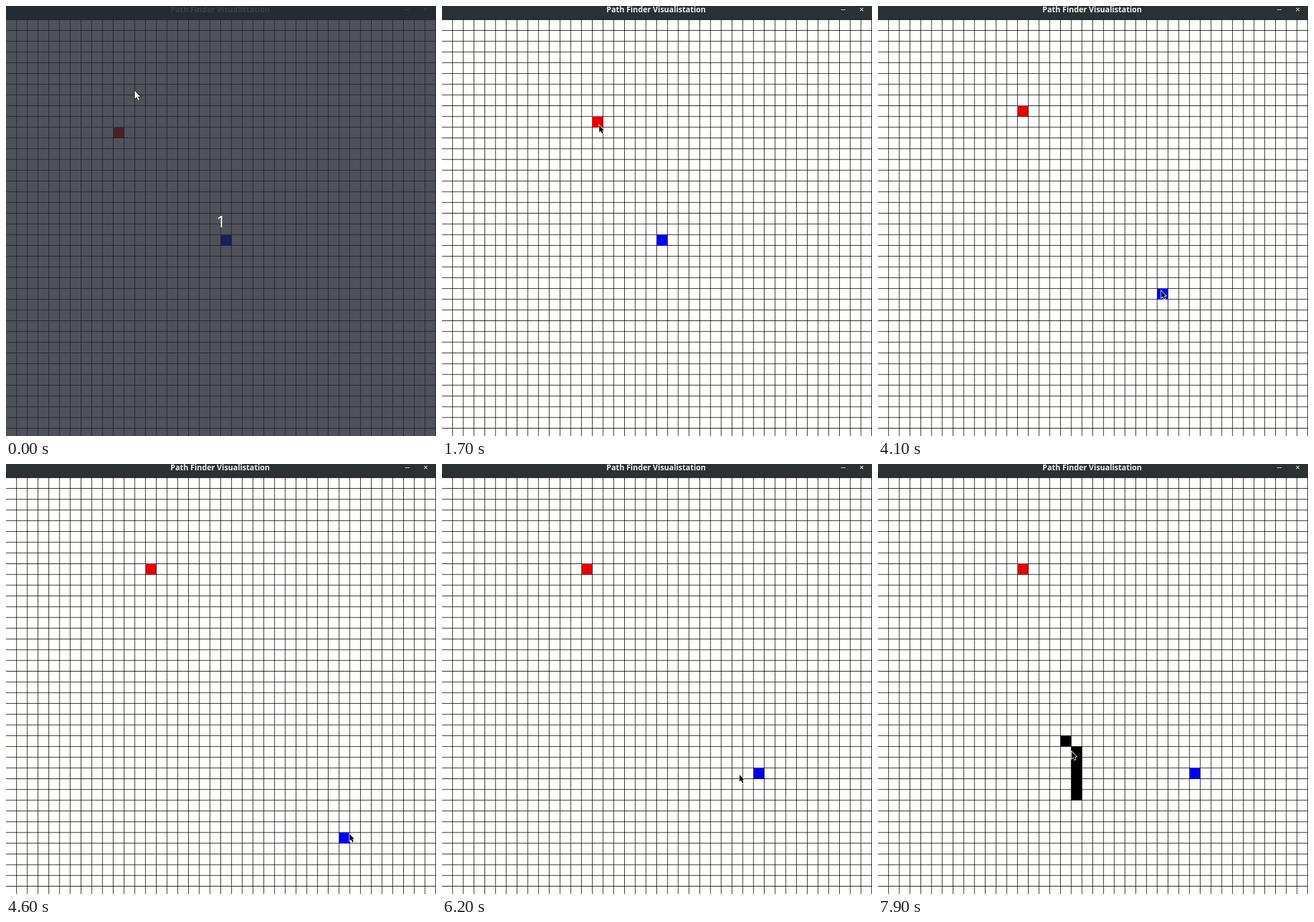
An HTML page with a canvas for the animation above (8 s loop, 748 px wide and 748 px high).

```html
<!DOCTYPE html>
<html lang="en">
<head>
<meta charset="utf-8">
<title>Path Finder</title>
<style>
  html, body { margin: 0; height: 100%; overflow: hidden; }
  canvas { display: block; }
</style>
</head>
<body>
<canvas id="stage" width="748" height="748"></canvas>
<script>
const SIZE = 748, SCENE = 800, SCALE = SIZE / SCENE;
const LOOP = 8000, STEP = 100;
const CELL = 20, LEFT = 19, TOP = 45, TITLE = 25;

const ctx = document.getElementById('stage').getContext('2d');

// The board is drawn with crisp pixels here, then scaled softly onto the stage
const board = document.createElement('canvas');
board.width = board.height = SCENE;
const pen = board.getContext('2d');

// Pointer strokes in stage pixels: [start ms, end ms, x, y]; it rests in between
const home = [225, 149];
const strokes = [
  [300, 600, 205, 233], [700, 900, 193, 225],
  [1400, 1700, 273, 207], [1700, 1900, 286, 196], [1900, 2300, 247, 178],
  [2600, 2800, 352, 386], [2900, 3400, 384, 398],
  [3700, 4100, 492, 495], [4100, 4600, 597, 643], [4600, 4900, 583, 663],
  [4900, 5400, 537, 553], [5400, 5700, 552, 539],
  [6100, 6200, 517, 540], [6200, 6600, 352, 577], [6700, 7000, 344, 577],
  [7600, 8000, 334, 474]
];

const clamp = (v, lo, hi) => Math.min(hi, Math.max(lo, v));

function pointerAt(t) {
  let [x, y] = home;
  for (const [start, end, toX, toY] of strokes) {
    const k = clamp((t - start) / (end - start), 0, 1);
    x += (toX - x) * k;
    y += (toY - y) * k;
  }
  return [x, y];
}

function rect(c, color, x, y, w, h) {
  c.fillStyle = color;
  c.fillRect(x, y, w, h);
}

function fillCellUnderPointer(color, t) {
  const [x, y] = pointerAt(t);
  const snap = (v, origin) => origin + CELL * Math.floor((v / SCALE - origin) / CELL);
  rect(pen, color, snap(x, LEFT), snap(y, TOP), CELL, CELL);
}

function drawBoard(t) {
  rect(pen, '#fffffd', 0, 0, SCENE, SCENE);
  for (let p = 0; p < SCENE; p += CELL) {
    rect(pen, '#000', LEFT + p, 0, 1, SCENE);
    rect(pen, '#000', 0, TITLE + p, SCENE, 1);
  }
  // Each end cell follows the pointer only while it is held
  fillCellUnderPointer('#e60000', clamp(t, 900, 2300));
  fillCellUnderPointer('#0000f0', clamp(t, 3400, 5700));
  // Walls run slightly ahead of the drawn pointer
  for (let s = 7300; s <= t; s += 50) fillCellUnderPointer('#000', s + 100);
  rect(pen, t < 1300 ? '#33393b' : '#2b3033', 0, 0, SCENE, TITLE);
  ctx.drawImage(board, 0, 0, SIZE, SIZE);
}

function drawTitle(ink) {
  ctx.fillStyle = ctx.strokeStyle = ink;
  ctx.lineWidth = 1.2;
  ctx.font = 'bold 13.4px "Open Sans", "Noto Sans", sans-serif';
  ctx.textAlign = 'center';
  ctx.fillText('Path Finder Visualistation', 372.5, 11);
  ctx.fillRect(694, 6, 8, 1);
  ctx.beginPath();
  ctx.moveTo(727.5, 3.5); ctx.lineTo(732.5, 8.5);
  ctx.moveTo(732.5, 3.5); ctx.lineTo(727.5, 8.5);
  ctx.stroke();
}

function drawPointer([x, y], scale, fill, edge) {
  ctx.save();
  ctx.translate(x + 0.5, y + 0.5);
  ctx.scale(scale, scale);
  ctx.beginPath();
  [[0, 0], [0, 12], [2.8, 9.5], [5, 14.5], [7, 13.6], [4.9, 9], [8.4, 8.7]]
    .forEach(p => ctx.lineTo(...p));
  ctx.closePath();
  ctx.fillStyle = fill;
  ctx.strokeStyle = edge;
  ctx.lineWidth = 1.8;
  ctx.stroke();
  ctx.fill();
  ctx.restore();
}

function draw(t) {
  drawBoard(t);
  drawTitle(t < 1300 ? '#9c9fa0' : '#f2f1ee');
  if (t >= 100) {
    drawPointer(pointerAt(t), 1, '#000', '#fff');
    return;
  }
  rect(ctx, 'rgba(35, 39, 49, 0.8)', 0, 0, SIZE, SIZE);
  ctx.fillStyle = '#fff';
  ctx.font = '28px "Noto Sans", sans-serif';
  ctx.fillText('1', 374, 385);
  drawPointer([223.5, 147], 1.15, '#fff', '#111');
}

function tick() {
  const t = performance.now() % LOOP;
  draw(Math.floor(t / STEP) * STEP);
  requestAnimationFrame(tick);
}
tick();
</script>
</body>
</html>
```
